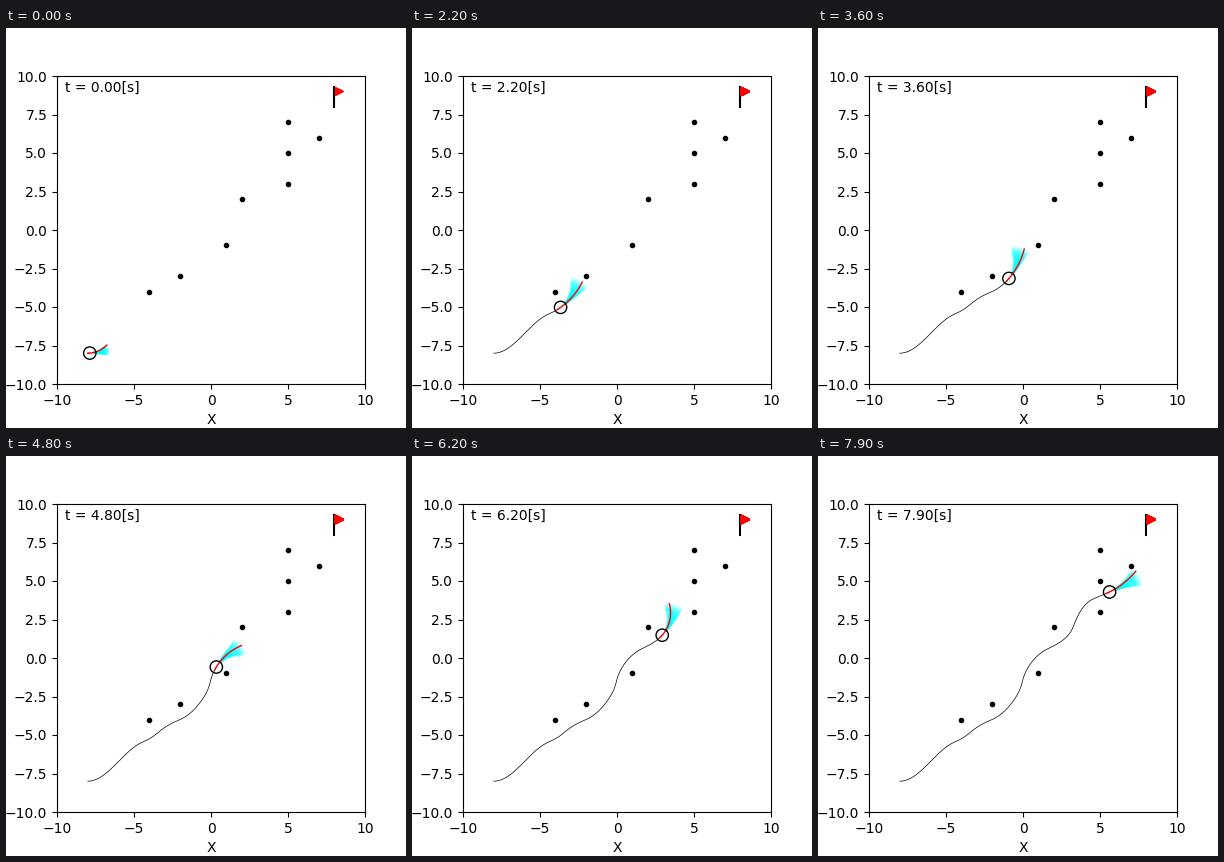
A matplotlib script that plays this animation: 400 px wide and 400 px high, repeating every 8 s.

```python
import numpy as np
import matplotlib.pyplot as plt
from matplotlib.animation import FuncAnimation
from matplotlib.collections import LineCollection
from matplotlib.patches import Circle

FRAMES, STEP_MS = 80, 100
SPEED = 0.24      # axis units per step
LOOKAHEAD = 2.42  # length of the predicted arcs
SPREAD = np.radians(14)

# Key points of the weaving route: x, y, heading in degrees
ROUTE = np.array([
    (-8, -8, 0), (-6.23, -6.95, 44), (-4.42, -5.45, 23), (-3.51, -4.9, 41),
    (-2.21, -4.09, 21), (-0.97, -3.21, 49), (-0.06, -1.59, 78),
    (1.62, 0.6, 25), (3.21, 1.92, 68), (4.55, 3.83, 24), (6.3, 4.71, 40)])


def hermite(a, b, n=60):
    """Cubic from key point a to key point b, with their headings."""
    t = np.linspace(0, 1, n, endpoint=False)[:, None]
    p, q = a[:2], b[:2]
    chord = np.hypot(*(q - p))
    m, k = (chord * np.array([np.cos(h), np.sin(h)])
            for h in np.radians([a[2], b[2]]))
    return ((2*t**3 - 3*t**2 + 1) * p + (t**3 - 2*t**2 + t) * m
            + (3*t**2 - 2*t**3) * q + (t**3 - t**2) * k)


px, py = np.vstack([hermite(a, b) for a, b in zip(ROUTE, ROUTE[1:])]).T
dist = np.concatenate([[0], np.cumsum(np.hypot(np.diff(px), np.diff(py)))])
angle = np.arctan2(np.gradient(py), np.gradient(px))


def travelled(i):
    """Short run-up, then constant speed."""
    return max(0, 0.13 + SPEED * i - 0.065 * (1 - np.exp(-i / 2)))


def pose(s):
    return [np.interp(s, dist, v) for v in (px, py, angle)]


def bend(s, h=0.35):
    """Smoothed curvature of the route."""
    lo, hi = np.interp([s - h, s + h], dist, angle)
    return (hi - lo) / (2 * h)


def arc_from(x, y, th, chord, length, start=0):
    """Circular arc whose end lies in direction th + chord."""
    u = np.linspace(start, 1, 25)
    r = length * u * np.sinc(chord * u / np.pi)
    return np.column_stack([x + r * np.cos(th + chord * u),
                            y + r * np.sin(th + chord * u)])


fig, ax = plt.subplots(figsize=(4, 4), dpi=100)
ax.set_xlim(-10, 10)
ax.set_ylim(-10, 10)
ax.set_aspect("equal")
ax.set_xlabel("X")

ax.plot([-4, -2, 1, 2, 5, 5, 5, 7], [-4, -3, -1, 2, 3, 5, 7, 6], ".k")
ax.plot([8, 8], [8, 9.3], "k", lw=1.5)
flag, = ax.plot([], [], ">r")
fan = LineCollection([], colors="cyan", linewidths=0.9, alpha=0.22, zorder=1.8)
ax.add_collection(fan)
trail, = ax.plot([], [], "k", lw=0.5)
best, = ax.plot([], [], "r", lw=1)
robot = ax.add_patch(Circle((-8, -8), 0.4, fill=False, lw=1, zorder=3))
clock = ax.text(0.025, 0.95, "", transform=ax.transAxes)


def update(i):
    s, s0 = travelled(i), travelled(i - 1)
    x, y, _ = pose(s)
    start = pose(s0)

    done = dist < s
    trail.set_data(np.append(px[done], x), np.append(py[done], y))
    robot.center = x, y

    # The chosen arc looks ahead on the route; the sampled fan lags behind it
    length = LOOKAHEAD - 1.04 * np.exp(-i / 2)
    steer = np.clip(bend(s0 + SPEED) * length / 2, -0.55, 0.55)
    mid = np.clip(bend(s0 - SPEED) * length / 2, steer - SPREAD, steer + SPREAD)
    best.set_data(*arc_from(*start, steer, length).T)
    fan.set_segments([
        arc_from(*start, c, length * k, 0.28)
        for c in np.linspace(mid - SPREAD, mid + SPREAD, 15)
        for k in (0.84, 0.89, 0.94, 1)])

    # The flag is stamped again each step, so its edges harden
    flag.set_data([8.3] * (i + 1), [9] * (i + 1))
    clock.set_text(f"t = {i * STEP_MS / 1000:.2f}[s]")
    return trail, robot, best, fan, flag, clock


anim = FuncAnimation(fig, update, frames=FRAMES, interval=STEP_MS,
                     repeat=True, repeat_delay=0)
plt.show()
```
